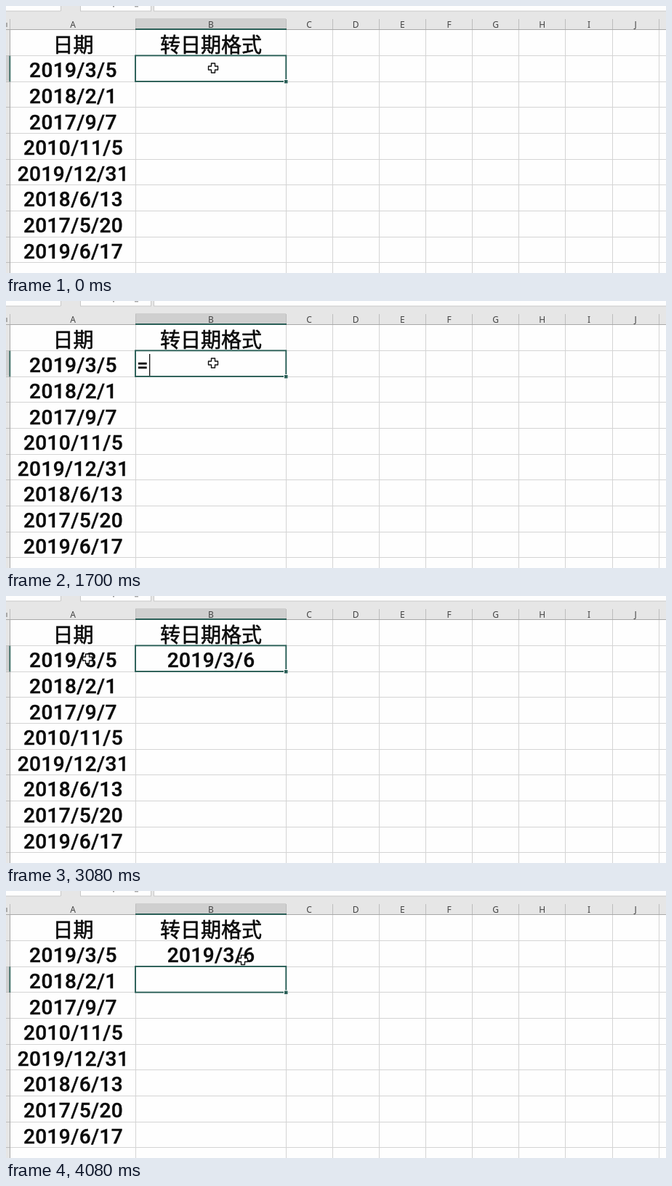
Recreate the animation shown at these times as an HTML page. Size 908 by 368 pixels, loop 4180 ms.

```html
<!DOCTYPE html>
<html lang="zh">
<head>
<meta charset="utf-8">
<style>
  html, body { margin: 0; width: 100%; height: 100%; overflow: hidden; background: #fff; }
  svg { display: block; width: 908px; height: 368px; }
  .cell { font: 500 28px Roboto, "Liberation Sans", sans-serif; letter-spacing: .4px; fill: #0b0b0b; stroke: #0b0b0b; stroke-width: .4; }
  .title { font: 500 28px "Noto Sans CJK SC", "Noto Sans CJK", sans-serif; fill: #0b0b0b; stroke: #0b0b0b; stroke-width: .6; }
  .mid { text-anchor: middle; }
  .letter { font: 12px "Noto Sans", "Open Sans", sans-serif; fill: #444; text-anchor: middle; }
</style>
</head>
<body>
<svg id="stage" viewBox="0 0 908 368"></svg>
<script>
const LOOP = 4180;
const ROW = 35.65, TOP = 33, COL_A = 6, COL_B = 178, COL_C = 385, COL_W = 64.15;
const GREEN = '#295e56', BLUE = '#426fb8', ANTS = '#2f5c94', GRID = '#d4d4d4', PANEL = '#e6e6e6';
const stage = document.getElementById('stage');

function add(tag, attrs, parent = stage, content) {
  const el = document.createElementNS('http://www.w3.org/2000/svg', tag);
  set(el, attrs);
  if (content !== undefined) el.textContent = content;
  parent.appendChild(el);
  return el;
}
function set(el, attrs) {
  for (const key in attrs) el.setAttribute(key, attrs[key]);
}
const rect = (x, y, width, height, fill, parent) => add('rect', { x, y, width, height, fill }, parent);
const text = (x, y, cls, content, parent) => add('text', { x, y, class: cls }, parent, content);
const group = () => add('g', {});
const show = (el, on) => el.setAttribute('visibility', on ? 'visible' : 'hidden');
const rowY = row => TOP + (row - 1) * ROW;

// Sheet background and grid
rect(0, 0, 908, 368, '#fefefe');
const refFill = rect(COL_A, rowY(2), COL_B - COL_A, ROW, '#e8eefa');
for (let row = 2; row <= 10; row++) rect(COL_A, Math.floor(rowY(row)), 902, 1, GRID);
const edges = [COL_B, ...Array.from({ length: 9 }, (_, i) => Math.floor(COL_C + i * COL_W))];
edges.forEach(x => rect(x, TOP, 1, 335, GRID));

// Formula bar and column headers
rect(0, 0, 908, 33, PANEL);
[[0, 75], [102, 98], [203, 705]].forEach(([x, w]) => {
  rect(x, 0, w, 7, '#fefefe');
  rect(x, 6.5, w, 1, '#c9c9c9');
});
[75, 102, 199, 203].forEach(x => rect(x, 0, 1, 7, '#c9c9c9'));
rect(147, 0, 2, 1.5, '#999');
rect(177, 0, 5, 1.5, '#aaa');
rect(COL_B, 17, COL_C - COL_B, 15, '#cfcfcf');
rect(0, 32, 908, 1, '#a8a8a8');
[COL_A - 1, ...edges].forEach(x => rect(x, 18, 1, 14, '#bdbdbd'));
rect(COL_B, 31, COL_C - COL_B + 1, 2, GREEN);
rect(0, 23, 2, 6, '#aaa');
[...'ABCDEFGHIJ'].forEach((letter, i) => {
  const x = i === 0 ? 92 : i === 1 ? 282 : COL_C + (i - 1.5) * COL_W;
  set(text(x, 30.3, 'letter', letter), i === 1 ? { fill: GREEN } : {});
});

// Row header strip
rect(0, 33, 5, 335, PANEL);
for (let row = 2; row <= 10; row++) rect(0, Math.floor(rowY(row)), 5, 1, '#bdbdbd');
rect(5, 33, 1, 335, '#a8a8a8');
const rowMark = group();
rect(0, 0, 5, ROW - 1, '#cfcfcf', rowMark);
rect(4.5, 0, 1.7, ROW, GREEN, rowMark);

// Cell contents
text(92.5, 63.5, 'title mid', '日期');
text(282, 63.5, 'title mid', '转日期格式');
['2019/3/5', '2018/2/1', '2017/9/7', '2010/11/5', '2019/12/31', '2018/6/13', '2017/5/20', '2019/6/17']
  .forEach((date, i) => text(92.5, 98.2 + i * ROW, 'cell mid', date));
const result = text(282.2, 98.2, 'cell mid', '2019/3/6');

// Active cell outline
const selection = group();
add('rect', { x: COL_B, y: 0, width: COL_C - COL_B + .3, height: ROW, fill: 'none', stroke: GREEN, 'stroke-width': 1.9 }, selection);
rect(382, ROW - 3, 6, 6, '#fff', selection);
rect(383, ROW - 2, 4.5, 4.5, GREEN, selection);

// Formula being typed
const parts = [
  { at: 1470, x: 180, end: 197, s: '=' },
  { at: 2100, x: 197, end: 232.5, s: 'A2' },
  { at: 2570, x: 234, end: 252.5, s: '+' },
  { at: 2790, x: 251, end: 268, s: '1' }
];
const ENTER = 3050;
for (const part of parts) {
  part.el = text(part.x, 98.2, 'cell', part.s);
  if (part.s === '=') part.el.style.fontWeight = 400;
  if (part.s === 'A2') part.el.style.fill = part.el.style.stroke = BLUE;
}
const caret = rect(0, 73, 1.3, 30, '#111');

// Outline of the referenced cell
const reference = group();
const box = { x: COL_A + .3, y: rowY(2), width: COL_B - COL_A - .3, height: ROW, fill: 'none', 'stroke-width': 2 };
add('rect', { ...box, stroke: '#fff' }, reference);
const ants = add('rect', box, reference);
const handles = group();
[COL_A, COL_B].forEach(x => [2, 3].forEach(row => rect(x - 2, rowY(row) - 2, 4.5, 4.5, BLUE, handles)));

const pointer = add('path', {
  d: 'M-2.5-6.5h5v4h4v5h-4v4h-5v-4h-4v-5h4z',
  fill: '#fff', stroke: '#111', 'stroke-width': 1.4, 'stroke-linejoin': 'round'
});
const pointerPath = [
  [0, 285, 85.5], [1840, 285, 85.5], [2060, 112, 86.5],
  [3480, 112, 86.5], [3680, 155, 67.5], [4060, 326, 95], [LOOP, 326, 95]
];

const clamp = v => Math.max(0, Math.min(1, v));
const smooth = v => v * v * (3 - 2 * v);

function pointerAt(t) {
  const i = Math.max(1, pointerPath.findIndex(p => p[0] > t));
  const [t0, x0, y0] = pointerPath[i - 1], [t1, x1, y1] = pointerPath[i];
  const k = smooth(clamp((t - t0) / (t1 - t0)));
  return [x0 + (x1 - x0) * k, y0 + (y1 - y0) * k];
}

function draw(t) {
  const editing = t >= parts[0].at && t < ENTER;
  const linked = editing && t >= parts[1].at;
  const marching = t < parts[2].at;

  parts.forEach(p => show(p.el, editing && t >= p.at));
  const last = parts.filter(p => t >= p.at).pop();
  if (last) caret.setAttribute('x', last.end);
  show(caret, editing);
  show(result, t >= ENTER);
  show(refFill, linked);
  show(reference, linked);
  show(handles, linked);
  set(ants, {
    stroke: marching ? ANTS : BLUE,
    'stroke-dasharray': marching ? '6 3' : 'none',
    'stroke-dashoffset': -t / 30 % 9
  });

  const activeRow = 2 + smooth(clamp((t - 3150) / 110));
  selection.setAttribute('transform', `translate(0 ${rowY(activeRow) - .3})`);
  rowMark.setAttribute('transform', `translate(0 ${rowY(t < 3180 ? 2 : 3)})`);
  pointer.setAttribute('transform', `translate(${pointerAt(t)})`);
}

const start = performance.now();
function tick() {
  draw((performance.now() - start) % LOOP);
  requestAnimationFrame(tick);
}
draw(0);
requestAnimationFrame(tick);
</script>
</body>
</html>
```
